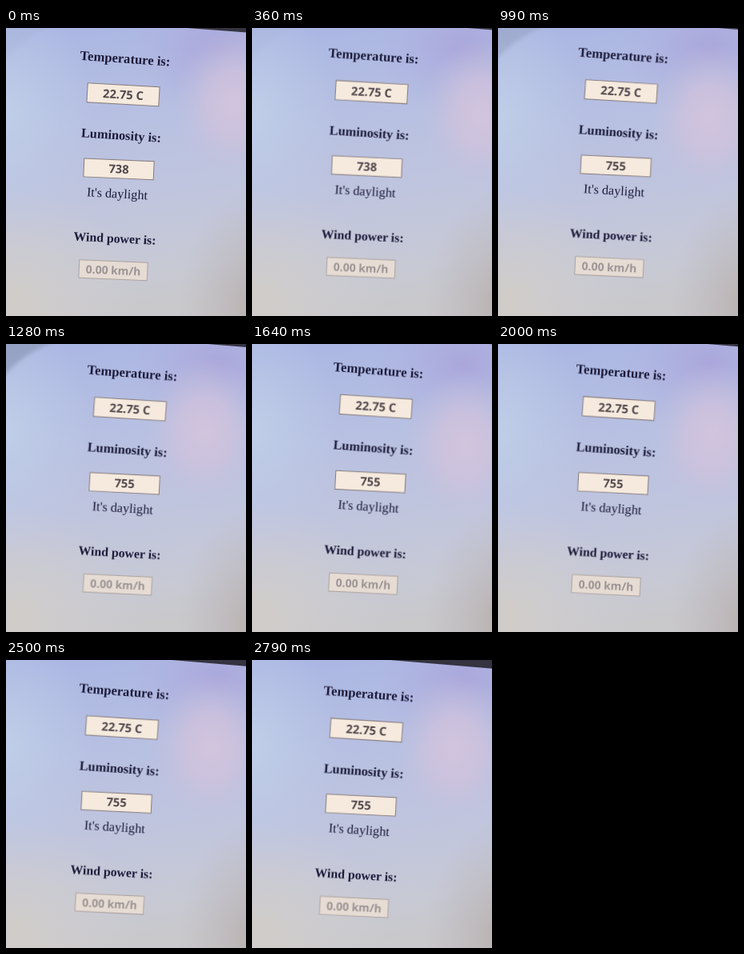
An HTML page that plays this animation: 300 by 360 pixels, repeating every 2.82 s.

```html
<!DOCTYPE html>
<html lang="en">
<head>
<meta charset="utf-8">
<title>Weather readings</title>
<style>
html, body { margin: 0; width: 100%; height: 100%; overflow: hidden; background: #bcc4df; }
svg { display: block; width: 300px; height: 360px; }
text { text-anchor: middle; fill: #1c1b3a; }
.head, .note { font-family: "Liberation Serif", "Times New Roman", serif; }
.head { font-weight: bold; }
.value { font: 600 14.7px "Noto Sans", sans-serif; fill: #51474c; }
.box { fill: #f5eadd; stroke: #857a7c; }
.off .box { fill: #e6dcd3; stroke: #aba2a0; }
.off .value { font-size: 13.9px; fill: #9b9394; }
</style>
</head>
<body>
<svg viewBox="0 0 300 360">
  <defs>
    <linearGradient id="sky" x1="0.35" y1="0" x2="0.45" y2="1">
      <stop offset="0" stop-color="#abb7e3"/>
      <stop offset="0.3" stop-color="#b7c0e2"/>
      <stop offset="0.6" stop-color="#c0c5de"/>
      <stop offset="0.85" stop-color="#c7c9d4"/>
      <stop offset="1" stop-color="#c9c8ca"/>
    </linearGradient>
    <radialGradient id="pink">
      <stop offset="0" stop-color="#d2c4dd"/>
      <stop offset="0.45" stop-color="#cec2dd" stop-opacity="0.8"/>
      <stop offset="1" stop-color="#c2c0dd" stop-opacity="0"/>
    </radialGradient>
    <radialGradient id="violet">
      <stop offset="0" stop-color="#aaa6db"/>
      <stop offset="1" stop-color="#b0b2e0" stop-opacity="0"/>
    </radialGradient>
    <radialGradient id="pale">
      <stop offset="0" stop-color="#bfcee8"/>
      <stop offset="1" stop-color="#bccae6" stop-opacity="0"/>
    </radialGradient>
    <radialGradient id="warm">
      <stop offset="0" stop-color="#d0ccc8"/>
      <stop offset="1" stop-color="#d0ced2" stop-opacity="0"/>
    </radialGradient>
    <radialGradient id="dusk">
      <stop offset="0" stop-color="#b7afad"/>
      <stop offset="1" stop-color="#bdb8c0" stop-opacity="0"/>
    </radialGradient>
    <filter id="soft"><feGaussianBlur stdDeviation="2.5"/></filter>
    <filter id="lens" filterUnits="userSpaceOnUse" x="-40" y="-40" width="400" height="440">
      <feGaussianBlur stdDeviation="0.35"/>
    </filter>
  </defs>
  <rect width="300" height="360" fill="url(#sky)"/>
  <ellipse cx="0" cy="110" rx="110" ry="150" fill="url(#pale)"/>
  <ellipse cx="10" cy="340" rx="160" ry="140" fill="url(#warm)"/>
  <ellipse cx="315" cy="350" rx="100" ry="150" fill="url(#dusk)"/>
  <ellipse cx="265" cy="25" rx="120" ry="90" fill="url(#violet)"/>
  <ellipse id="glow" rx="75" ry="95" fill="url(#pink)"/>
  <path id="shade" d="M-9 -9H80Q22 6 -9 48Z" fill="#8995b3" filter="url(#soft)"/>
  <g filter="url(#lens)">
    <g id="scene">
      <path d="M-40 -40H360V10L-40 -20Z" fill="#34333f"/>
    </g>
  </g>
</svg>
<script>
const LOOP = 2820, TOP = 39, SPAN = 264, MID = 140;
const $ = id => document.getElementById(id);

// time, shift at top x y, shift at bottom x y, glow x y, corner shade
const KEYS = [
  [0, 0, 0, 0, 0, 285, 95, 0.1],
  [710, 6, -5.5, 4, -5, 284, 118, 0.1],
  [1280, 9, -2, 5.5, -2, 248, 110, 0.65],
  [1640, 9, -5.5, 5, -3, 266, 128, 0],
  [2000, 5, -3, 1, -1, 268, 117, 0],
  [2500, -1, 1, -4.5, 2, 256, 110, 0],
  [2790, -3, 4, -6.5, 6, 254, 112, 0]
];

function add(parent, tag, attrs, label = "") {
  const el = document.createElementNS("http://www.w3.org/2000/svg", tag);
  for (const k in attrs) el.setAttribute(k, attrs[k]);
  el.textContent = label;
  return parent.appendChild(el);
}

function group(x, y, angle, cls = "") {
  return add($("scene"), "g", { class: cls, transform: `translate(${x} ${y}) rotate(${angle})` });
}

function line(x, y, angle, cls, size, label) {
  add(group(x, y, angle), "text", { class: cls, y: 5.3, "font-size": size }, label);
}

function field(x, y, angle, w, h, label, cls) {
  const g = group(x, y, angle, cls);
  add(g, "rect", { class: "box", x: -w / 2, y: -h / 2, width: w, height: h });
  return add(g, "text", { class: "value", y: 5.2 }, label);
}

line(149, 38.4, 4, "head", 16.6, "Temperature is:");
field(146.5, 83.3, 3.2, 90, 24, "22.75 C");
line(144, 134.2, 3.7, "head", 16.3, "Luminosity is:");
const light = field(141, 176.3, 2.5, 87.5, 23, "738");
line(139, 207, 3.2, "note", 16.2, "It's daylight");
line(136, 262.9, 2.9, "head", 15.8, "Wind power is:");
field(134, 302.7, 2.4, 85.5, 22.5, "0.00 km/h", "off");

// The picture advances about every 71.5 ms
const start = i => 70 * i + 10 * Math.max(0, Math.floor(i * 0.1925 - 0.92));

function hold(t) {
  let i = 39;
  while (i && start(i) > t) i--;
  return start(i);
}

function slope(i, c) {
  const a = KEYS[Math.max(0, i - 1)], b = KEYS[Math.min(KEYS.length - 1, i + 1)];
  return (b[c] - a[c]) / (b[0] - a[0]);
}

function sample(t, c) {
  let i = 0;
  while (i < KEYS.length - 2 && KEYS[i + 1][0] <= t) i++;
  const a = KEYS[i], b = KEYS[i + 1], d = b[0] - a[0], u = (t - a[0]) / d;
  const s = u * u * (3 - 2 * u);
  return a[c] + (b[c] - a[c]) * s
    + d * u * (1 - u) * ((1 - u) * slope(i, c) - u * slope(i + 1, c));
}

function draw(t) {
  const [tx, ty, bx, by, gx, gy, dark] = [1, 2, 3, 4, 5, 6, 7].map(c => sample(t, c));
  const lean = (bx - tx) / SPAN, grow = (by - ty) / SPAN, tilt = -0.6 * lean;
  const m = [1, tilt, lean, 1 + grow, tx - lean * TOP, ty - grow * TOP - tilt * MID];
  $("scene").setAttribute("transform", `matrix(${m.map(v => v.toFixed(4))})`);
  $("glow").setAttribute("cx", gx);
  $("glow").setAttribute("cy", gy);
  $("shade").setAttribute("opacity", Math.max(0, dark));
  light.textContent = t < 990 ? "738" : "755";
}

const begin = performance.now();
function tick() {
  draw(hold((performance.now() - begin) % LOOP));
  requestAnimationFrame(tick);
}
tick();
</script>
</body>
</html>
```
